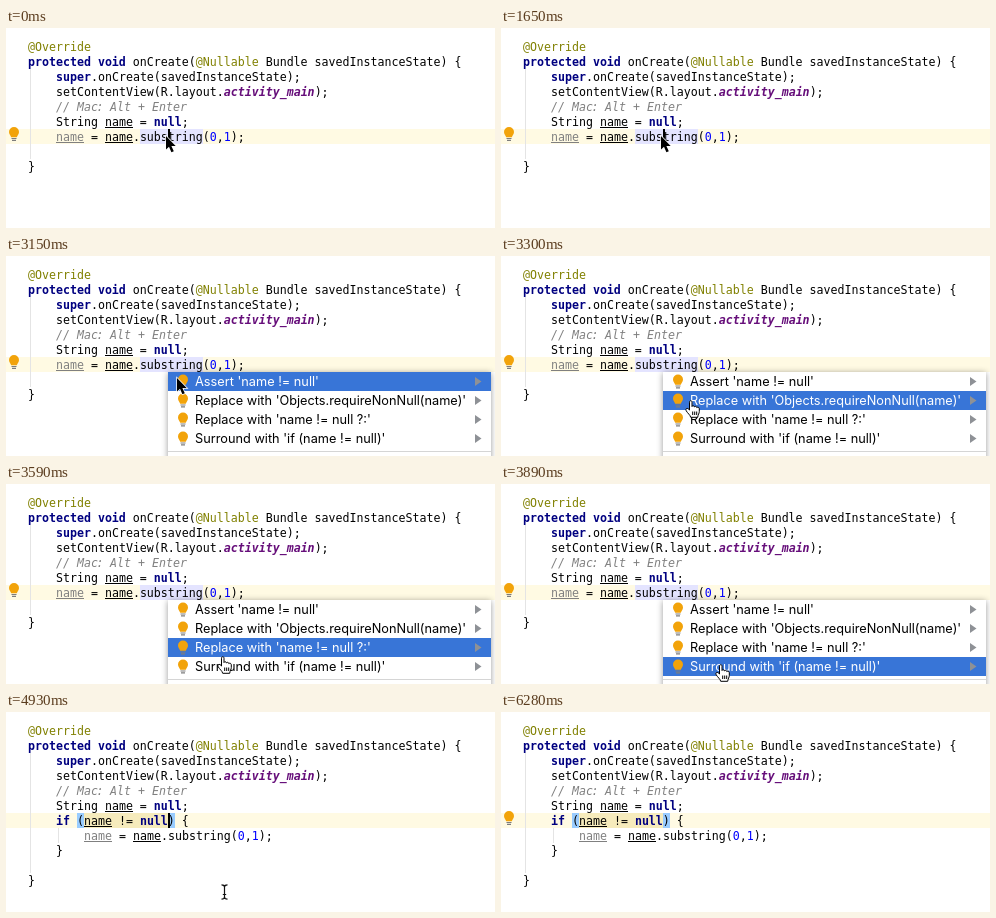
An HTML page that plays this animation: 489 px wide and 200 px high, repeating every 6.86 s.

```html
<!DOCTYPE html>
<html lang="en">
<head>
<meta charset="utf-8">
<title>Quick fix menu</title>
<style>
html, body { margin: 0; width: 100%; height: 100%; overflow: hidden; background: #fff; }
svg { display: block; width: 489px; height: 200px; }
text { white-space: pre; }
rect { shape-rendering: crispEdges; }
.code { font: 11.627px "DejaVu Sans Mono", monospace; fill: #000; }
.k { fill: #000080; font-weight: bold; }
.a { fill: #808000; }
.n { fill: #0000ff; }
.c { fill: #808080; font-style: italic; }
.f { fill: #660e7a; font-weight: bold; font-style: italic; }
.dim { fill: #808080; }
.guide { fill: #e4e4e4; }
.brace { fill: #99ccff; }
.row { font: 12.75px Inter, "Open Sans", sans-serif; }
.panel { filter: drop-shadow(0 1px 3px rgba(0,0,0,.4)); }

/* One shared 6.86 s clock; every change is a hard cut */
.t { animation: 6.86s step-end infinite; }
.before { animation-name: before; }
.after { animation-name: after; }
.caret { animation-name: caret; }
.bulb { animation-name: bulb; }
.menu { animation-name: menu; }
.bar { animation-name: bar; }
.inner { animation-name: inner; }
.warn { animation-name: warn; }
.unused { animation-name: unused; }
.arrow { animation-name: arrow; }
.hand { animation-name: hand; }
.beam { animation-name: beam; }
.r0 { animation-name: r0; }
.r1 { animation-name: r1; }
.r2 { animation-name: r2; }
.r3 { animation-name: r3; }

@keyframes before { 0% { opacity: 1 } 63.119%, 100% { opacity: 0 } }
@keyframes after { 0% { opacity: 0 } 63.119%, 100% { opacity: 1 } }
@keyframes caret {
  0%, 8.746%, 24.052%, 63.119% { opacity: 1 }
  2.186%, 17.492%, 28.425%, 91.545%, 100% { opacity: 0 }
}
@keyframes bulb { 0%, 78.425%, 100% { opacity: 1 } 63.119% { opacity: 0 } }
@keyframes menu { 0%, 63.119%, 100% { opacity: 0 } 28.425% { opacity: 1 } }
@keyframes bar {
  0% { transform: translateY(0) }
  48.104% { transform: translateY(19px) }
  50.291% { transform: translateY(38px) }
  54.518%, 100% { transform: translateY(57px) }
}
@keyframes r0 { 0% { fill: #fff } 48.104%, 100% { fill: #000 } }
@keyframes r1 { 0%, 50.291%, 100% { fill: #000 } 48.104% { fill: #fff } }
@keyframes r2 { 0%, 54.518%, 100% { fill: #000 } 50.291% { fill: #fff } }
@keyframes r3 { 0% { fill: #000 } 54.518%, 100% { fill: #fff } }
@keyframes inner { 0% { opacity: 0 } 67.492%, 100% { opacity: 1 } }
@keyframes warn { 0% { opacity: 0 } 69.679%, 100% { opacity: 1 } }
@keyframes unused { 0% { fill: #000 } 71.865%, 100% { fill: #808080 } }
@keyframes arrow {
  0% { opacity: 1; transform: translate(160px, 108px) }
  45.918% { opacity: 1; transform: translate(171px, 122px) }
  48.104%, 100% { opacity: 0; transform: translate(171px, 122px) }
}
@keyframes hand {
  0% { opacity: 0; transform: translate(184px, 144px) }
  48.104% { opacity: 1; transform: translate(184px, 144px) }
  50.291% { opacity: 1; transform: translate(205px, 165px) }
  52.332% { opacity: 1; transform: translate(211px, 172px) }
  54.518% { opacity: 1; transform: translate(212px, 178px) }
  56.705% { opacity: 1; transform: translate(214px, 180px) }
  63.119%, 100% { opacity: 0; transform: translate(214px, 180px) }
}
@keyframes beam {
  0% { opacity: 0; transform: translate(215px, 172px) }
  63.119% { opacity: 1; transform: translate(215px, 172px) }
  74.052% { opacity: 1; transform: translate(219px, 173px) }
  76.239% { opacity: 1; transform: translate(255px, 182px) }
  78.425%, 100% { opacity: 0; transform: translate(255px, 182px) }
}
</style>
</head>
<body>
<svg viewBox="0 0 489 200">
  <defs>
    <g id="lamp">
      <path d="M8 99a5 5 0 0 1 5 5c0 2.4-1.6 3.2-2.2 5.2H5.2C4.600 107.200 3 106.400 3 104a5 5 0 0 1 5-5z" fill="#f2a30a"/>
      <path d="M5.500 110.500h5M6 112.400h4" stroke="#7d7d7d" stroke-width="1.200"/>
    </g>
    <path id="more" d="M469 121l6.500 4.500l-6.500 4.500z" fill="#8e9196"/>
  </defs>

  <rect y="101" width="489" height="15" fill="#fffae3"/>
  <rect class="guide" x="24" y="41" width="1" height="90"/>

  <g class="code">
    <text class="a" x="22" y="23">@Override</text>
    <text x="22" y="38"><tspan class="k">protected void</tspan> onCreate(<tspan class="a">@Nullable</tspan> Bundle savedInstanceState) {</text>
    <text x="50" y="53"><tspan class="k">super</tspan>.onCreate(savedInstanceState);</text>
    <text x="50" y="68">setContentView(R.layout.<tspan class="f">activity_main</tspan>);</text>
    <text class="c" x="50" y="83">// Mac<tspan x="90.500">:</tspan><tspan x="104">Alt + Enter</tspan></text>
    <text x="50" y="98">String name = <tspan class="k">null</tspan>;</text>
    <rect x="99" y="99" width="28" height="1"/>

    <g class="t before">
      <rect x="134" y="101" width="63" height="15" fill="#e4e4ff"/>
      <text x="50" y="113"><tspan class="dim">name</tspan> = name.substring(<tspan class="n">0</tspan>,<tspan class="n">1</tspan>);</text>
      <rect class="dim" x="50" y="114" width="28" height="1"/>
      <rect x="99" y="114" width="28" height="1"/>
      <text x="22" y="143">}</text>
    </g>

    <g class="t after">
      <rect class="guide" x="24" y="131" width="1" height="30"/>
      <rect class="t inner guide" x="52" y="116" width="1" height="15"/>
      <rect class="brace" x="71" y="101" width="7" height="15"/>
      <rect class="brace" x="162" y="101" width="7" height="15"/>
      <g class="t warn">
        <rect x="78" y="101" width="84" height="15" fill="#f6ebbc"/>
        <rect x="78" y="114" width="28" height="1"/>
        <rect class="dim" x="78" y="129" width="28" height="1"/>
        <rect x="127" y="129" width="28" height="1"/>
      </g>
      <text x="50" y="113"><tspan class="k">if</tspan> (name != <tspan class="k">null</tspan>) {</text>
      <text class="t unused" x="78" y="128">name</text>
      <text x="113" y="128">= name.substring(<tspan class="n">0</tspan>,<tspan class="n">1</tspan>);</text>
      <text x="50" y="143">}</text>
      <text x="22" y="173">}</text>
    </g>
  </g>

  <rect class="t caret" x="162" y="101" width="2" height="15"/>
  <use class="t bulb" href="#lamp"/>

  <g class="t menu">
    <rect class="panel" x="162" y="116" width="323" height="110" fill="#fff"/>
    <rect class="t bar" x="162" y="116" width="323" height="19" fill="#3875d7"/>
    <rect x="162" y="195" width="323" height="1" fill="#d5d5d5"/>
    <g class="row">
      <text class="t r0" x="189" y="130">Assert 'name != null'</text>
      <text class="t r1" x="189" y="149">Replace with 'Objects.requireNonNull(name)'</text>
      <text class="t r2" x="189" y="168">Replace with 'name != null ?:'</text>
      <text class="t r3" x="189" y="187">Surround with 'if (name != null)'</text>
    </g>
    <use href="#lamp" x="169" y="19.500"/><use href="#more"/>
    <use href="#lamp" x="169" y="38.500"/><use href="#more" y="19"/>
    <use href="#lamp" x="169" y="57.500"/><use href="#more" y="38"/>
    <use href="#lamp" x="169" y="76.500"/><use href="#more" y="57"/>
  </g>

  <path class="t arrow" d="M0 0V13.500L3 10.700L5.400 16.300L7.800 15.300L5.400 9.900H9.700Z" stroke="#fff" stroke-width="1.500" paint-order="stroke"/>
  <path class="t hand" d="M4.500 10V2.200C4.500 .2 7 .2 7 2.200V6.500C7.400 5.300 9.300 5.500 9.400 6.900C10 5.900 11.700 6.200 11.800 7.600C12.500 6.800 14.300 7.200 14.300 8.800V11.500C14.300 13.500 13 14.500 12.700 17.300H5.700C5.300 15 2.800 13.500 1.200 10.800C.1 8.900 2 7.700 3.200 8.800ZM7.700 11.500V15M9.700 11.500V15M11.700 11.500V15" fill="#fff" stroke="#000" stroke-linejoin="round"/>
  <g class="t beam" fill="none">
    <path id="ibar" d="M.5 .8C2.500 .8 3.500 1.500 3.500 3V13C3.500 14.500 2.500 15.200 .5 15.200M6.500 .8C4.500 .8 3.500 1.500 3.500 3M3.500 13C3.500 14.500 4.500 15.200 6.500 15.200M1.800 10.500H5.200" stroke="#111" stroke-width="1.200"/>
  </g>
</svg>
</body>
</html>
```
